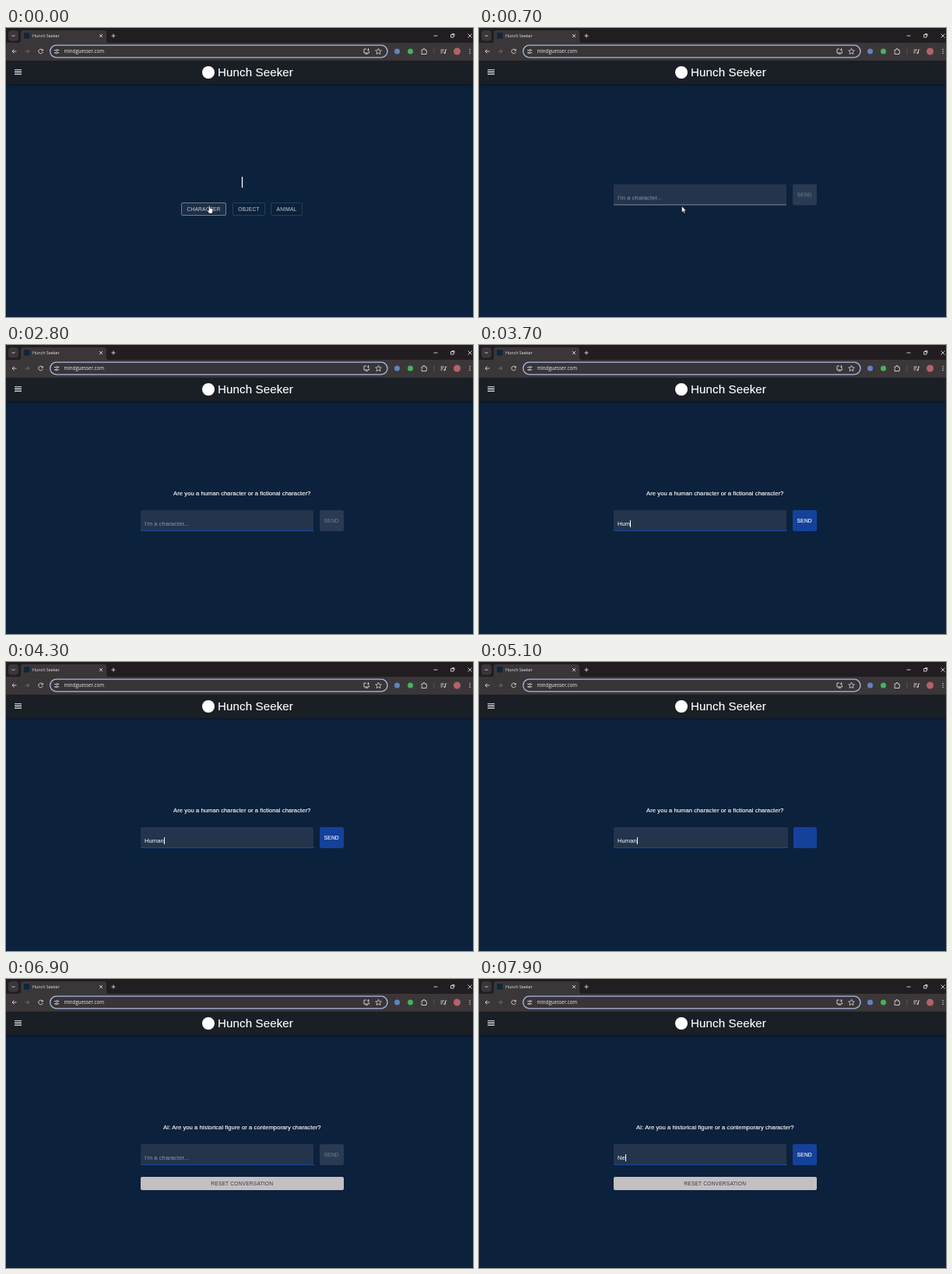
An HTML page for the animation above (8000 ms loop, 600 by 371 pixels).

```html
<!DOCTYPE html>
<html lang="en">
<head>
<meta charset="utf-8">
<title>Hunch Seeker</title>
<style>
html, body { margin: 0; width: 100%; height: 100%; overflow: hidden; }
body { position: relative; background: #0c213b; color: #fff; font: 7.6px "Liberation Sans", Arial, sans-serif; letter-spacing: .00938em; }
body * { position: absolute; box-sizing: border-box; white-space: nowrap; }
.browser, .pointer { left: 0; top: 0; }
.browser text { font-family: "Open Sans", "Noto Sans", sans-serif; letter-spacing: 0; }

header { left: 0; top: 42px; width: 600px; height: 30px; background: #1a1e25; box-shadow: 0 1px 3px #0007; }
.menu { left: 11px; top: 10px; }
.logo { left: 252px; top: 6.5px; width: 16px; height: 16px; border-radius: 50%; background: #fff; }
h1 { left: 272px; top: 0; margin: 0; font-size: 15.1px; font-weight: 400; line-height: 29px; letter-spacing: .0075em; }
h1, .ask, .reply { -webkit-text-stroke: .15px; }

/* Every animation shares one 8 s clock */
.start, .form, .pointer, .ask, .reply, .reset, .field, .line, .hint, .typed::before, .caret, .send, .send span {
  animation: 8s step-end infinite;
}
.btn { font-size: 6.65px; letter-spacing: .02857em; text-align: center; border-radius: 2px; }
.start { left: 0; top: 0; animation-name: start; }
.start .btn { top: 224px; height: 17px; line-height: 15.5px; border: 1px solid #24405a; color: #c9cfd6; }
.start .hover { background: #1d2f47; border-color: #757a82; }
.bar { left: 301.5px; top: 187px; font-size: 15.4px; line-height: 20px; }

.form { left: 172.5px; top: 0; width: 261.5px; height: 371px; animation-name: form; }
.ask, .reply { top: 186.3px; width: 100%; line-height: 10px; text-align: center; }
.ask { animation-name: ask; }
.reply, .reset { animation-name: reply; }
.field { left: 0; top: 212px; width: 222.5px; height: 26.5px; background: #23344c; border-bottom: 1px solid #7f8b99; border-radius: 2px 2px 0 0; animation-name: field; }
.line { left: 0; bottom: -1px; width: 100%; height: 1px; background: #1546a3; animation-name: line; }
.hint, .typed { left: 5.5px; top: 13px; line-height: 9px; height: 9px; }
.hint { color: #8f9baa; animation-name: hint; }
.typed::before { content: ""; animation-name: typed; }
.caret { position: static; display: inline-block; width: .8px; height: 9px; background: #fff; vertical-align: top; animation-name: caret; }
.send { right: 0; top: 212px; width: 31.5px; height: 26.5px; line-height: 27.5px; animation-name: send; }
.send span { position: static; animation-name: label; -webkit-text-stroke: .12px; }
.reset { left: 0; top: 253.7px; width: 100%; height: 17.6px; line-height: 17.6px; background: #c3c0c3; color: #37373c; }
.pointer { animation-name: pointer; }
.hand { animation: start 8s step-end infinite; }
.arrow { animation: arrow 8s step-end infinite; }

@keyframes start { 0% { opacity: 1 } 3.75%, 100% { opacity: 0 } }
@keyframes arrow { 0% { opacity: 0 } 3.75%, 100% { opacity: 1 } }
@keyframes form {
  0% { opacity: 0; transform: translateY(-11.5px) }
  3.75% { opacity: 1; transform: translateY(-11.5px) }
  15%, 100% { opacity: 1; transform: none }
}
@keyframes pointer { 0% { opacity: 1 } 15%, 100% { opacity: 0 } }
@keyframes ask { 0% { opacity: 0 } 15% { opacity: 1 } 66.25%, 100% { opacity: 0 } }
@keyframes reply { 0% { opacity: 0 } 66.25%, 100% { opacity: 1 } }
@keyframes field { 0% { width: 222.5px } 58.75% { width: 224px } 66.25%, 100% { width: 222.5px } }
@keyframes line {
  0% { transform: scaleX(0) }
  15% { transform: scaleX(0); animation-timing-function: ease-out }
  17.5%, 100% { transform: none }
}
@keyframes hint { 0% { opacity: 1 } 40.6% { opacity: 0 } 66.25% { opacity: 1 } 94.4%, 100% { opacity: 0 } }
@keyframes typed {
  0% { content: "" }
  40.6% { content: "H" }
  43.1% { content: "Hu" }
  45.6% { content: "Hum" }
  48.1% { content: "Huma" }
  50.6% { content: "Human" }
  66.25% { content: "" }
  94.4% { content: "N" }
  96.9%, 100% { content: "Ne" }
}
@keyframes caret {
  0% { opacity: 0 } 15% { opacity: 1 }
  21% { opacity: 0 } 27.2% { opacity: 1 }
  33.4% { opacity: 0 } 39.6% { opacity: 1 }
  56.9% { opacity: 0 } 63.1% { opacity: 1 }
  69.4% { opacity: 0 } 75.6% { opacity: 1 }
  81.9% { opacity: 0 } 88.1%, 100% { opacity: 1 }
}
@keyframes send {
  0% { background: #293a52; color: #6c7987; width: 31.5px }
  40.6% { background: #293a52; color: #6c7987; width: 31.5px; animation-timing-function: ease }
  43.7% { background: #14419b; color: #fff; width: 31.5px }
  58.75% { background: #14419b; color: #fff; width: 30px }
  66.25% { background: #293a52; color: #6c7987; width: 31.5px }
  94.4% { background: #293a52; color: #6c7987; width: 31.5px; animation-timing-function: ease }
  97.5%, 100% { background: #14419b; color: #fff; width: 31.5px }
}
@keyframes label { 0% { opacity: 1 } 58.75% { opacity: 0 } 66.25%, 100% { opacity: 1 } }
</style>
</head>
<body>
<svg class="browser" width="600" height="42" fill="none" stroke="#dcd8da" stroke-width=".9">
  <g stroke="none">
    <path fill="#211d20" d="M0 0h600v42H0z"/>
    <path fill="#3b3739" d="M0 42V19h16q3 0 3-3V6q0-3 3-3h104q3 0 3 3v10q0 3 3 3h468v23z"/>
    <rect x="3" y="3" width="13" height="13.5" rx="4" fill="#3a3639"/>
    <rect x="23" y="6" width="7.5" height="7.5" fill="#0d2740"/>
    <text x="34" y="12.2" font-size="5.4" fill="#e6e3e5">Hunch Seeker</text>
  </g>
  <path d="M7.5 9l2 2 2-2M120 8l4 4m0-4l-4 4M135.5 10h5m-2.5-2.5v5M549.5 10h5M593.5 7.5l5 5m0-5l-5 5"/>
  <path d="M571.5 8.500h3.500v3.500h-3.500zM573 7.500h3v3"/>
  <rect x="56.7" y="22.2" width="433.3" height="15.6" rx="7.8" fill="#383438" stroke="#a9bbe3" stroke-width="1.3"/>
  <text x="74.5" y="32.3" font-size="6.2" fill="#eeebed" stroke="none">mindguesser.com</text>
  <path d="M13.5 30H8m2.5-2.5L8 30l2.5 2.5M47 28.5a2.8 2.8 0 1 0 .3 2.2M47.3 27v2h-2"/>
  <path stroke="#777376" d="M24.5 30H30m-2.5-2.5L30 30l-2.5 2.5"/>
  <path d="M62 28.5h2.5m2.2 0h1.600M62 31.8h1.600m2.200 0h2.500"/>
  <circle cx="65.7" cy="28.5" r="1"/><circle cx="64.6" cy="31.8" r="1"/>
  <path d="M463 27h-3v5h6.500v-2M461.5 33.2h3.500M465.5 26v3m-1.300-1.200l1.300 1.300 1.300-1.300"/>
  <path stroke-width=".8" d="M478.5 26.2l1.100 2.500 2.700.3-2 1.800.6 2.700-2.400-1.400-2.400 1.400.6-2.700-2-1.800 2.700-.3z"/>
  <path d="M534 28h2v-1q1-1.500 2 0v1h2v2q1.800.8 0 2v1.500h-6v-2q1.500-.7 0-1.800z"/>
  <path stroke="#625e61" stroke-width=".7" d="M550 26v8"/>
  <path d="M558.5 28h4.500m-4.500 2h3m-3 2h2M564.5 32v-4h1.800"/>
  <circle cx="563.5" cy="32" r=".8"/>
  <g stroke="none">
    <circle cx="502.5" cy="30" r="3.5" fill="#5f85bd"/>
    <circle cx="519.5" cy="30" r="3.5" fill="#42b35c"/>
    <circle cx="579.5" cy="30" r="4.5" fill="#b5626a"/>
    <g fill="#dcd8da"><circle cx="596" cy="27.5" r=".7"/><circle cx="596" cy="30" r=".7"/><circle cx="596" cy="32.5" r=".7"/></g>
  </g>
</svg>

<header>
  <svg class="menu" width="9" height="10" stroke="#f2f2f2" stroke-width="1.1"><path d="M0 1.700h9M0 4.400h9M0 7.100h9"/></svg>
  <div class="logo"></div>
  <h1>Hunch Seeker</h1>
</header>

<div class="start">
  <div class="bar">|</div>
  <div class="btn hover" style="left:225px;width:58px">CHARACTER</div>
  <div class="btn" style="left:291px;width:42px">OBJECT</div>
  <div class="btn" style="left:340px;width:41px">ANIMAL</div>
</div>

<div class="form">
  <div class="ask">Are you a human character or a fictional character?</div>
  <div class="reply">AI: Are you a historical figure or a contemporary character?</div>
  <div class="field">
    <div class="line"></div>
    <div class="hint">I'm a character...</div>
    <div class="typed"><i class="caret"></i></div>
  </div>
  <div class="btn send"><span>SEND</span></div>
  <div class="btn reset">RESET CONVERSATION</div>
</div>

<svg class="pointer" width="600" height="371" fill="#fff" stroke="#111" stroke-width=".5">
  <path class="hand" d="M260.5 228.5q1-.8 1.500.3v2.500l3 .7q1 .3.800 1.500l-.8 4.500h-4l-2.500-3.500q0-1.200 2 0z"/>
  <path class="arrow" d="M260.5 228.800v8l1.900-1.700 1.300 2.800 1.300-.6-1.300-2.700h2.400z"/>
</svg>
</body>
</html>
```
